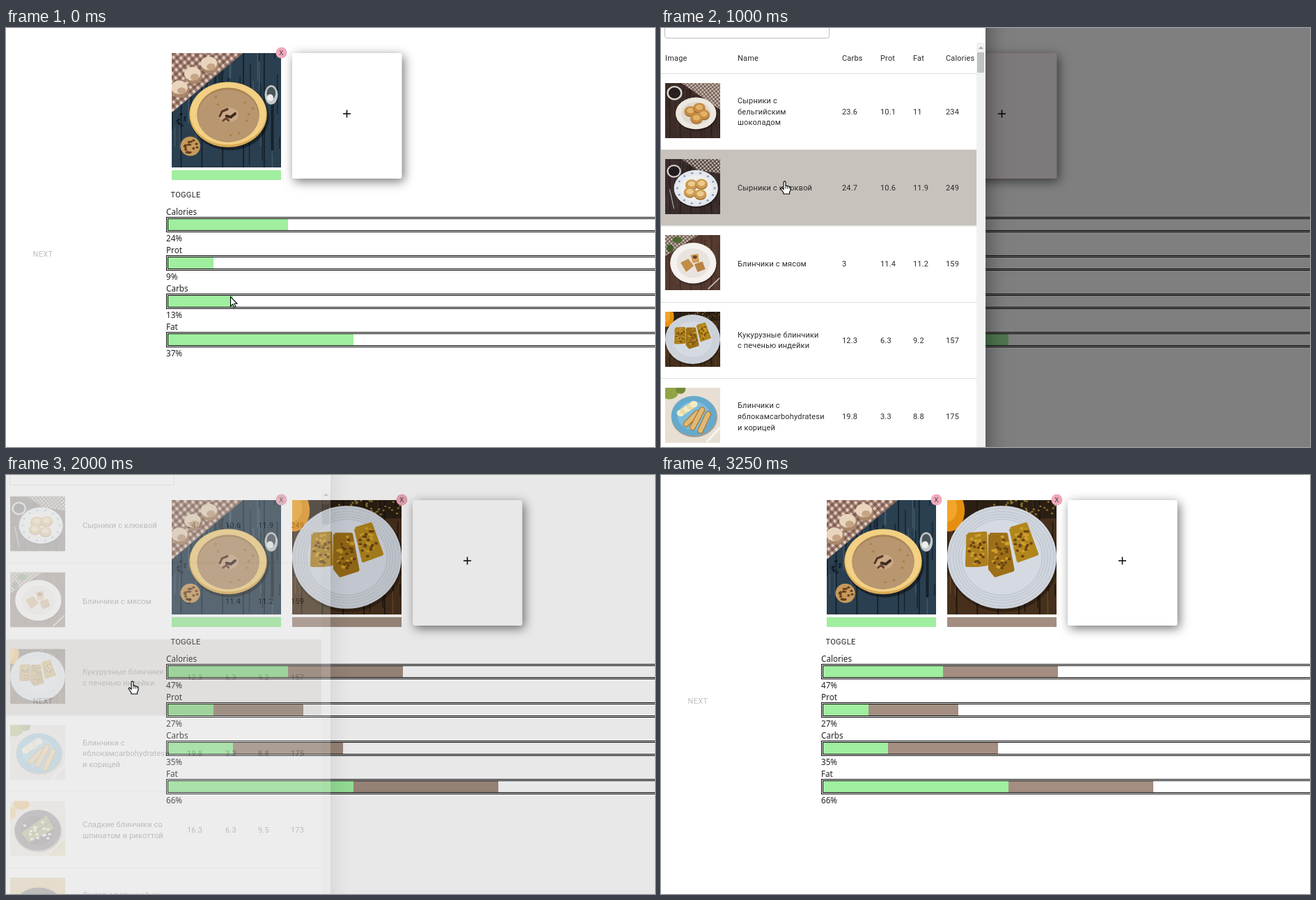
An HTML page with a canvas that plays this animation: 932x601 px, repeating every 3.5 s.

```html
<!DOCTYPE html>
<html lang="en">
<head>
<meta charset="utf-8">
<title>Meal planner</title>
<style>
html, body { margin: 0; width: 100%; height: 100%; overflow: hidden; background: #fff; }
canvas { display: block; }
</style>
</head>
<body>
<canvas id="stage" width="932" height="601"></canvas>
<script>
const W = 932, H = 601, STEP = 250, STEPS = 14;
const stage = document.getElementById('stage').getContext('2d');
const layer = Object.assign(document.createElement('canvas'), { width: W, height: H }).getContext('2d');
let g = stage;

const UI = '11px Roboto, sans-serif', BODY = '11.7px "Noto Sans", sans-serif';
const GREEN = '#a0ee9f', BROWN = '#a38e81', INK = '#222';

// ---------- drawing helpers ----------
function box(x, y, w, h, fill) { g.fillStyle = fill; g.fillRect(x, y, w, h); }

function text(s, x, y, font = UI, fill = INK, spacing = 0) {
  g.font = font;
  g.fillStyle = fill;
  g.letterSpacing = spacing + 'px';
  g.fillText(s, x, y);
}

function oval(x, y, rx, ry, fill, turn = 0) {
  g.beginPath();
  g.ellipse(x, y, rx, ry, turn, 0, 7);
  g.fillStyle = fill;
  g.fill();
}

function trace(p) {
  g.beginPath();
  for (let i = 0; i < p.length; i += 2) g.lineTo(p[i], p[i + 1]);
}

function poly(fill, ...p) {
  trace(p);
  g.closePath();
  g.fillStyle = fill;
  g.fill();
}

function line(color, width, ...p) {
  trace(p);
  g.strokeStyle = color;
  g.lineWidth = width;
  g.stroke();
}

function ring(x, y, rx, ry, color, width) {
  g.beginPath();
  g.ellipse(x, y, rx, ry, 0, 0, 7);
  g.strokeStyle = color;
  g.lineWidth = width;
  g.stroke();
}

// a repeatable value from 0 to 1
const noise = n => { const v = Math.sin(n * 127.1) * 43758.5; return v - Math.floor(v); };

// specks inside an ellipse
function specks(n, x, y, rx, ry, size, fill) {
  for (let i = 0; i < n; i++) {
    const a = noise(i + x) * 6.3, d = Math.sqrt(noise(i * 3 + y));
    oval(x + rx * d * Math.cos(a), y + ry * d * Math.sin(a), size, size * .8, fill);
  }
}

function cloth(dark, ...p) {
  g.save();
  poly('#dfcdc0', ...p);
  g.clip();
  g.rotate(-.7);
  g.globalAlpha = .55;
  for (let i = -100; i < 130; i += 5) {
    box(i, -120, 2.6, 260, dark);
    box(-120, i, 260, 2.6, dark);
  }
  g.restore();
}

function planks(base, seam, light) {
  box(0, 0, 100, 100, base);
  for (let i = 0; i < 60; i++)
    box(noise(i) * 100, noise(i + 70) * 90 - 10, .9, 10 + noise(i + 30) * 25, i % 2 ? light : seam);
  for (let i = 8; i < 100; i += 19) box(i, 0, 1.2, 100, seam);
}

function plate(x, y, rx, ry, rim, well) {
  oval(x + 1, y + 2, rx + 1, ry + 1, 'rgba(0,0,0,.3)');
  oval(x, y, rx, ry, rim);
  oval(x, y, rx * .72, ry * .72, well);
}

function pancake(x, y, rx, ry, fill, top) {
  oval(x, y + 1.5, rx, ry, '#8d5a25');
  oval(x, y, rx, ry, fill);
  oval(x, y - 1, rx * .6, ry * .55, top);
}

// ---------- dishes on a 100 by 100 field ----------
const dishes = {
  soup() {
    planks('#2a3f4f', '#15232e', '#42596a');
    cloth('#6a4034', 0, 0, 65, 0, 0, 52);
    for (const [x, y] of [[35, 9], [20, 18], [8, 30]]) {
      oval(x, y + 2, 8, 7, '#a98769');
      oval(x - 1, y, 7.5, 6, '#e9d5bd');
      oval(x + 1, y + 3, 4, 3, '#c6a587');
    }
    oval(53, 56, 36, 29, 'rgba(0,0,0,.45)');
    oval(51.6, 53.8, 35.5, 28.5, '#d9ab55');
    oval(51.6, 52.8, 34.8, 27.3, '#f2d084');
    oval(51.6, 54, 28.5, 23.8, '#a98456');
    oval(51.6, 55, 28, 23, '#b8966f');
    specks(12, 51.6, 54, 24, 19, 1.2, '#a8813f');
    oval(52, 54, 9, 6.5, '#c9a986');
    g.lineCap = 'round';
    line('#5b3828', 2, 44, 55, 46, 51, 51, 49);
    line('#3e2921', 2.4, 50, 55, 54, 56, 58, 53);
    line('#6c4632', 2, 47, 59, 50, 57, 52, 59);
    line('#16222b', 2.6, 92, 42, 92, 84);
    g.lineCap = 'butt';
    oval(91, 36.5, 6, 8.5, '#c3c8cb');
    oval(91, 35, 4, 5.5, '#4b555c');
    oval(90, 39, 3, 3, '#eceeee');
    oval(17, 81.5, 9, 8.5, '#c79a5b');
    specks(16, 17, 81.5, 7, 6.5, 1.3, '#67401f');
    specks(9, 9, 59, 4, 6, 1, '#0d151b');
  },
  chocolate() {
    planks('#3d2c28', '#271b19', '#54403a');
    cloth('#584540', 30, 0, 100, 0, 100, 48);
    oval(17, 18, 14, 13, '#ddd8d3');
    oval(17, 18, 11, 10, '#28211f');
    plate(56, 55, 37, 29, '#ece8e0', '#dfd8cc');
    for (const [x, y] of [[46, 51], [62, 45], [70, 57], [57, 64]]) pancake(x, y, 11, 9, '#c68a42', '#e2b268');
  },
  berries() {
    planks('#3a2d2c', '#221a1a', '#4d3f3d');
    cloth('#27201f', 30, 0, 100, 0, 100, 26, 60, 20);
    oval(16, 22, 13, 12, '#d2cdc9');
    oval(16, 22, 10, 9, '#211c1f');
    line('#aaa', 1.5, 8, 55, 16, 90);
    plate(56, 53, 40, 33, '#e4e8ee', '#f0efec');
    for (let i = 0; i < 14; i++) oval(56 + 34 * Math.cos(i * .45), 53 + 28 * Math.sin(i * .45), 2, 1.6, '#8094b5');
    for (const [x, y] of [[48, 46], [66, 45], [45, 60], [64, 64]]) pancake(x, y, 11, 9, '#cd9c51', '#ecca8c');
  },
  meat() {
    planks('#553a30', '#38241d', '#6a4b3e');
    cloth('#50413c', 0, 0, 60, 0, 0, 38);
    oval(22, 9, 9, 6, '#4e6a30');
    oval(9, 24, 6, 7, '#3f5a2b');
    line('#c6c1bc', 2, 78, 98, 99, 78);
    plate(51, 51, 42, 37, '#f5f1ee', '#e9e3df');
    poly('#c18d48', 28, 50, 42, 43, 52, 56, 38, 67);
    poly('#d0a05a', 46, 36, 60, 34, 62, 49, 50, 51);
    poly('#b98342', 53, 53, 68, 48, 73, 62, 59, 67);
    oval(54, 40, 4, 3, '#704326');
  },
  corn() {
    planks('#46301c', '#20150d', '#6b4a29');
    box(0, 0, 100, 16, 'rgba(25,20,14,.6)');
    specks(60, 72, 5, 32, 11, 1, '#8d762f');
    oval(2, 9, 14, 18.5, '#e58f10');
    oval(0, 7, 9, 12, '#f2a52a');
    plate(50, 50, 50, 45, '#d0d5dd', '#d5dae2');
    for (const k of [.74, .79, .84, .89, .95]) ring(50, 50, 50 * k, 45 * k, '#bbc2cd', .6);
    g.lineJoin = 'round';
    const pieces = [
      ['#ad7f1e', 19, 30, 35, 29, 36, 56, 28, 57, 18, 57],
      ['#9d6f18', 39, 30, 54, 30, 60, 61, 44, 66, 39, 60],
      ['#b1861d', 58, 25, 72, 21, 82, 47, 65, 53]
    ];
    for (const [fill, ...p] of pieces) {
      poly(fill, ...p);
      line(fill, 3, ...p, p[0], p[1]);
    }
    for (const [x, y, ry] of [[27, 43, 13], [49, 47, 17], [69, 37, 13]]) {
      specks(16, x, y, 8, ry, 1.6, '#cf9f2c');
      specks(16, x + .5, y + .5, 8, ry, 1.5, '#6d4612');
    }
    g.lineJoin = 'miter';
  },
  apple() {
    box(0, 0, 100, 100, '#e7dfd3');
    oval(8, 8, 16, 13, '#91a445');
    oval(28, 3, 9, 8, '#75893a');
    line('#f6f3ee', 4, 75, 99, 100, 72);
    plate(52, 51, 41, 36, '#65aacc', '#7dbddb');
    for (let i = 0; i < 5; i++) oval(28 + i * 6, 46 - i * 4, 7, 6, i % 2 ? '#e6dcaa' : '#f3ebc5');
    g.lineCap = 'round';
    for (const p of [[38, 66, 58, 46], [50, 72, 67, 40], [64, 78, 78, 48]]) {
      line('#a87534', 11, ...p);
      line('#e2b973', 8, ...p);
    }
    g.lineCap = 'butt';
  },
  spinach() {
    box(0, 0, 100, 100, '#e8e0d2');
    oval(20, 6, 15, 10, '#eaa32a');
    oval(3, 22, 8, 11, '#efb64b');
    for (let i = 0; i < 5; i++) line('#d8b64f', 2, 72 + i * 7, 100, 102, 70 + i * 7);
    plate(50, 53, 42, 37, '#4b4446', '#3a3436');
    poly('#89883b', 20, 58, 66, 26, 80, 50, 34, 76);
    line('#5e6328', 2, 28, 66, 73, 38);
    for (let i = 0; i < 16; i++) box(24 + noise(i) * 46, 36 + noise(i + 9) * 32, 5, 4, '#efecdf');
  },
  omelette() {
    box(0, 0, 100, 100, '#d9bd72');
    cloth('#d5a52c', 0, 0, 100, 0, 100, 20, 0, 35);
    plate(52, 56, 46, 38, '#34322f', '#282624');
  }
};

function dish(name, x, y, w, h) {
  g.save();
  g.beginPath();
  g.rect(x, y, w, h);
  g.clip();
  g.translate(x, y);
  g.scale(w / 100, h / 100);
  dishes[name]();
  g.restore();
}

// ---------- main page ----------
const bars = [['Calories', 24, 23], ['Prot', 9, 18], ['Carbs', 13, 22], ['Fat', 37, 29]];

function mealCard(name, x, color) {
  dish(name, x, 36, 157, 164);
  box(x, 204, 157, 14, color);
  oval(x + 157.5, 35.5, 8, 8, '#f1a9bd');
  text('X', x + 154.6, 39, '9.5px "Noto Sans", sans-serif', '#333');
}

function addCard(x, fill) {
  g.save();
  g.shadowColor = 'rgba(0,0,0,.55)';
  g.shadowBlur = 15;
  g.shadowOffsetX = 3;
  g.shadowOffsetY = 4;
  g.fillStyle = fill;
  g.beginPath();
  g.roundRect(x, 36, 157.5, 180, 3);
  g.fill();
  g.restore();
  line('#111', 1.6, x + 73, 123, x + 84, 123);
  line('#111', 1.6, x + 78.5, 117.5, x + 78.5, 128.5);
}

function page(full, cardFill, toggleHover) {
  box(0, 0, W, H, '#fff');
  mealCard('soup', 238, GREEN);
  if (full) mealCard('corn', 411, BROWN);
  addCard(full ? 584 : 411, cardFill);
  if (toggleHover) box(228, 226, 59, 26, '#f4f4f4');
  text('TOGGLE', 236.5, 243, UI, INK, .3);
  text('NEXT', 38.5, 328, UI, '#bdbdbd', .3);
  bars.forEach(([name, first, second], i) => {
    const y = 271 + i * 55, edge = percent => Math.round(233 + percent * 7.18);
    text(name, 230, y - 3, BODY);
    g.strokeStyle = '#000';
    g.lineWidth = 1;
    g.strokeRect(230.5, y + .5, 722, 21);
    g.strokeRect(232.5, y + 2.5, 718, 17);
    if (full) box(233, y + 3, edge(first + second) - 233, 16, BROWN);
    box(233, y + 3, edge(first) - 233, 16, GREEN);
    text(first + (full ? second : 0) + '%', 230, y + 35, BODY);
  });
}

// ---------- drawer with the food table ----------
const columns = [260, 315, 362, 409], ROW = 109.3, HEAD = 65.7;
const rows = [
  ['chocolate', 'Сырники с|бельгийским|шоколадом', 23.6, 10.1, 11, 234],
  ['berries', 'Сырники с клюквой', 24.7, 10.6, 11.9, 249],
  ['meat', 'Блинчики с мясом', 3, 11.4, 11.2, 159],
  ['corn', 'Кукурузные блинчики|с печенью индейки', 12.3, 6.3, 9.2, 157],
  ['apple', 'Блинчики с|яблокамcarbohydratesи|и корицей', 19.8, 3.3, 8.8, 175],
  ['spinach', 'Сладкие блинчики со|шпинатом и рикоттой', 16.3, 6.3, 9.5, 173],
  ['omelette', 'Омлет с ветчиной из|индейки|и сыром', 2.1, 11.8, 10.4, 150]
];
const cell = (s, x, y) => text(s, x, y + 4, UI, '#2b2b2b', .17);

function drawer(scroll, hover) {
  g.clearRect(0, 0, W, H);
  g.save();
  g.shadowColor = 'rgba(0,0,0,.5)';
  g.shadowBlur = 30;
  box(-40, -40, 506, 700, '#fff');
  g.restore();

  g.strokeStyle = '#bdbdbd';
  g.lineWidth = 1;
  g.beginPath();
  g.roundRect(5.5, -20, 236, 34.5, 3);
  g.stroke();

  g.save();
  g.beginPath();
  g.rect(0, 21, 466, H);
  g.clip();
  g.translate(0, -scroll);
  ['Carbs', 'Prot', 'Fat', 'Calories'].forEach((s, i) => cell(s, columns[i], 43));
  cell('Image', 6, 43);
  cell('Name', 110, 43);
  box(0, 65, 453, 1, '#e0e0e0');
  rows.forEach(([photo, name, ...values], i) => {
    const top = HEAD + i * ROW, mid = top + 54;
    if (i === hover) box(0, top, 453, ROW, '#c7c2bc');
    box(0, Math.round(top + ROW - 1), 453, 1, '#e0e0e0');
    dish(photo, 6, Math.round(top + 13), 79, 79);
    const lines = name.split('|');
    lines.forEach((s, k) => cell(s, 110, mid + (k - (lines.length - 1) / 2) * 15.75));
    values.forEach((v, k) => cell(v, columns[k], mid));
  });
  g.restore();

  box(453, 21, 13, H, '#f1f1f1');
  box(454, 35 + scroll * .045, 10, 29, '#c1c1c1');
  poly(scroll ? '#505050' : '#a3a3a3', 456, 30, 459.5, 26.5, 463, 30);
}

// ---------- pointer ----------
const arrow = new Path2D('M0 0V13.5L3.2 10.6 5.3 15.4 7.4 14.4 5.4 9.8H9.4Z');
const hand = new Path2D('M-1.5 1.5Q0-.7 1.5 1.5V7Q3 6 4 7.5 5.5 6.8 6.5 8.2 8 7.6 8.5 9.5V13L7 16.2V18.5H-1.5V17L-5.5 11Q-5 9-3.5 10L-1.5 12Z');

function pointer(shape, x, y) {
  g.save();
  g.translate(x + .5, y + .5);
  g.fillStyle = '#fff';
  g.strokeStyle = '#000';
  g.lineWidth = 1.1;
  g.fill(shape);
  g.stroke(shape);
  if (shape === hand) for (const k of [1.5, 4, 6.5]) line('#000', .8, k, 8, k, 11);
  g.restore();
}

// ---------- timeline, one entry per quarter second ----------
const path = [
  [arrow, 322, 385], [hand, 440, 170], [hand, 258, 231], [hand, 304, 181], [hand, 177, 219],
  [hand, 176, 240], [hand, 175, 279], [hand, 181, 295], [hand, 181, 295], [arrow, 176, 296],
  [arrow, 176, 296], [arrow, 179, 297], [arrow, 246, 444]
];
const cardFill = { 1: '#f6cdd8', 2: '#ecb4c3', 3: '#e8bfc9', 4: '#fdf4f6' };
const modal = {
  3: { shade: .41, alpha: .8, scroll: 0, hover: 0 },
  4: { shade: .5, alpha: 1, scroll: 0, hover: 1 },
  5: { shade: .5, alpha: 1, scroll: 105, hover: 2 },
  6: { shade: .5, alpha: 1, scroll: 157.5, hover: 3 },
  7: { shade: .5, alpha: 1, scroll: 157.5, hover: 3 },
  8: { shade: .09, alpha: .23, scroll: 157.5, hover: 3 }
};

function draw(step) {
  g = stage;
  page(step >= 8, cardFill[step] || '#fff', step === 2);
  const m = modal[step];
  if (m) {
    box(0, 0, W, H, `rgba(0,0,0,${m.shade})`);
    g = layer;
    drawer(m.scroll, m.hover);
    g = stage;
    g.globalAlpha = m.alpha;
    g.drawImage(layer.canvas, 0, 0);
    g.globalAlpha = 1;
  }
  if (path[step]) pointer(...path[step]);
}

const start = performance.now();
let shown = -1;
function tick() {
  const step = Math.floor((performance.now() - start) / STEP) % STEPS;
  if (step !== shown) draw(shown = step);
  requestAnimationFrame(tick);
}
tick();
</script>
</body>
</html>
```
